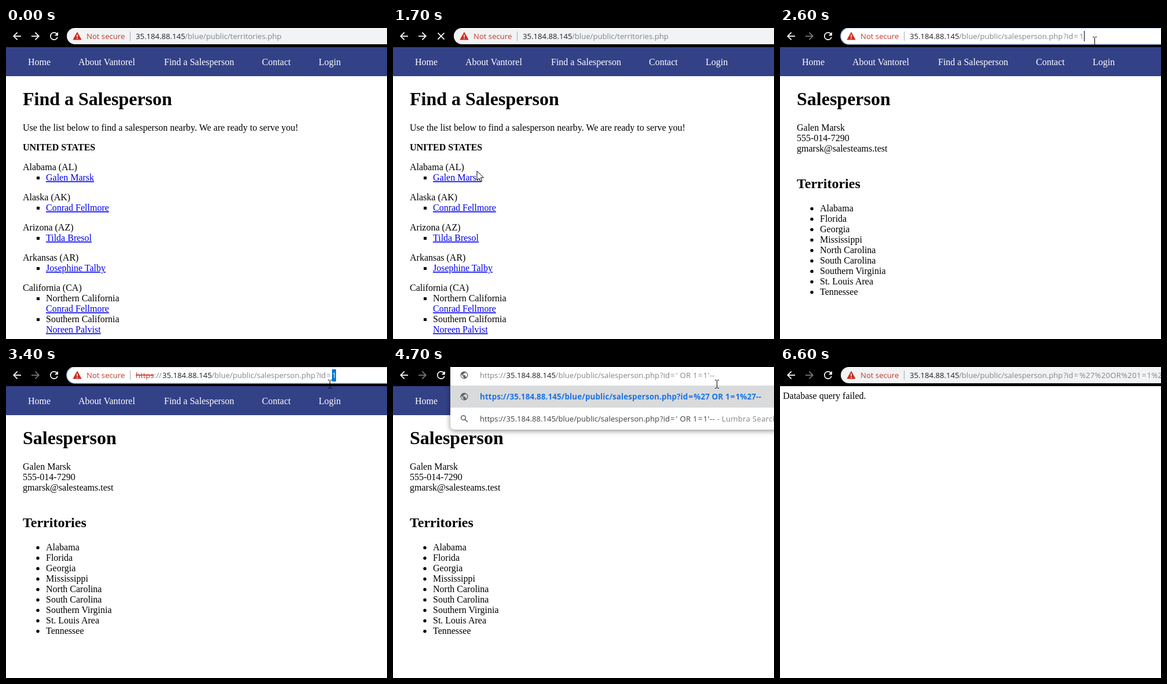
Recreate the animation shown at these times as an HTML page. Size 658 by 536 pixels, loop 6.8 s.

```html
<!DOCTYPE html>
<html lang="en">
<head>
<meta charset="utf-8">
<title>Salesperson lookup</title>
<style>
  html, body { margin: 0; width: 100%; height: 100%; overflow: hidden; background: #fff; }
  svg { display: block; }
  text { white-space: pre; }
  .page { font: 16px "Liberation Serif", "Times New Roman", serif; }
  .bar { font: 13.14px "Open Sans", "Noto Sans", sans-serif; }
  .popup { filter: drop-shadow(0 2px 5px rgba(0, 0, 0, .45)); }
</style>
</head>
<body>
<svg id="stage" width="658" height="536" viewBox="0 0 658 536"></svg>
<script>
const LOOP = 6800, STEP = 100;
const stage = document.getElementById('stage');
const DARK = '#202124', GREY = '#80868b', RED = '#c5392b', ICON = '#5f6368';
const HOST = '35.184.88.145', DIR = '/blue/public/', INJECTION = "' OR 1=1'--";

const ICONS = {
  back: 'M20 11H7.83l5.59-5.59L12 4l-8 8 8 8 1.41-1.41L7.83 13H20v-2z',
  forward: 'M4 11h12.17l-5.59-5.59L12 4l8 8-8 8-1.41-1.41L16.17 13H4v-2z',
  reload: 'M17.65 6.35A7.95 7.95 0 0 0 12 4a8 8 0 1 0 7.73 10h-2.08A6 6 0 1 1 12 6c1.66 0 3.14.69 4.22 1.78L13 11h7V4l-2.35 2.35z',
  stop: 'M19 6.41L17.59 5 12 10.59 6.41 5 5 6.41 10.59 12 5 17.59 6.41 19 12 13.41 17.59 19 19 17.59 13.41 12z',
  globe: 'M12 2a10 10 0 1 0 0 20 10 10 0 0 0 0-20zm-1 17.93A8 8 0 0 1 4 12c0-.62.08-1.21.21-1.79L9 15v1c0 1.1.9 2 2 2v1.93zm6.9-2.54A2 2 0 0 0 16 16h-1v-3c0-.55-.45-1-1-1H8v-2h2c.55 0 1-.45 1-1V7h2c1.1 0 2-.9 2-2v-.41A8 8 0 0 1 17.9 17.39z'
};

const rect = (x, y, w, h, fill, more = '') =>
  `<rect x="${x}" y="${y}" width="${w}" height="${h}" fill="${fill}" ${more}/>`;
const text = (x, y, s, fill = '#000', more = '') =>
  `<text x="${x}" y="${y}" fill="${fill}" ${more}>${s}</text>`;
const icon = (name, cx, cy, k, fill) =>
  `<path d="${ICONS[name]}" fill="${fill}" transform="translate(${cx} ${cy}) scale(${k}) translate(-12 -12)"/>`;
const bold = size => `font-weight="700" font-size="${size}"`;
// a little air on both sides of "="
const air = s => s.replace(/=(.?)/g, '<tspan dx="1.1">=</tspan><tspan dx="1">$1</tspan>');

// --- pages ---
function nav() {
  const links = [[38, 'Home'], [125, 'About Vantorel'], [273, 'Find a Salesperson'], [442, 'Contact'], [540, 'Login']];
  return rect(0, 33, 658, 50, '#334187') + links.map(([x, s]) => text(x, 64, s, '#fff')).join('');
}

function territories() {
  const link = (y, s) => text(69, y, s, '#0000ee', 'text-decoration="underline"');
  const square = y => rect(53, y - 7, 5, 5, '#000');
  const states = [['Alabama (AL)', 'Galen Marsk'], ['Alaska (AK)', 'Conrad Fellmore'],
    ['Arizona (AZ)', 'Tilda Bresol'], ['Arkansas (AR)', 'Josephine Talby']];
  const regions = [['Northern California', 'Conrad Fellmore'], ['Southern California', 'Noreen Palvist']];
  return nav() + text(29, 133, 'Find a Salesperson', '#000', bold(32))
    + text(29, 177, 'Use the list below to find a salesperson nearby. We are ready to serve you!')
    + text(29, 211, 'UNITED STATES', '#000', bold(16))
    + states.map(([s, who], i) => {
      const y = 245 + 52 * i;
      return text(29, y, s) + square(y + 18) + link(y + 18, who);
    }).join('')
    + text(29, 453, 'California (CA)')
    + regions.map(([s, who], i) => {
      const y = 471 + 36 * i;
      return square(y) + text(69, y, s) + link(y + 18, who);
    }).join('');
}

function salesperson() {
  const areas = ['Alabama', 'Florida', 'Georgia', 'Mississippi', 'North Carolina',
    'South Carolina', 'Southern Virginia', 'St. Louis Area', 'Tennessee'];
  return nav() + text(29, 133, 'Salesperson', '#000', bold(32))
    + ['Galen Marsk', '555-014-7290', 'gmarsk@salesteams.test'].map((s, i) => text(29, 177 + 18 * i, s)).join('')
    + text(29, 276, 'Territories', '#000', bold(24))
    + areas.map((s, i) => {
      const y = 316 + 18 * i;
      return `<circle cx="55" cy="${y - 4.5}" r="2.7"/>` + text(69, y, s);
    }).join('');
}

const failed = () => text(5, 55, 'Database query failed.');

// --- address bar ---
function address(x, y, tail, host = DARK, rest = GREY, after = '') {
  return text(x, y, HOST, host) + text(x + 85, y, DIR + 'salesperson.php', rest)
    + text(x + 265.4, y, air('?id='), rest)
    + text(x + 292.9, y, air(tail) + after, rest, 'letter-spacing=".3"');
}

function buttons(loading, canForward) {
  return rect(0, 0, 658, 33, '#000') + icon('back', 19, 14, .875, '#fff')
    + icon('forward', 51, 14, .875, canForward ? '#fff' : '#74777a')
    + icon(loading ? 'stop' : 'reload', 83, 14, .875, '#fff');
}

function field(focused) {
  const look = focused ? 'rx="14" stroke="#a9c4f1" stroke-width="1.6"' : 'rx="14"';
  return rect(105, 0, 620, 28, focused ? '#fff' : '#f1f3f4', look)
    + '<path d="M123 7.5L130 20H116Z" fill="#d02b20" stroke="#d02b20" stroke-linejoin="round"/>'
    + rect(122.2, 11.5, 1.6, 4.2, '#fff') + rect(122.2, 17, 1.6, 1.6, '#fff')
    + text(139, 19, 'Not secure', RED) + rect(214, 6, 1, 16, '#a3a7ab');
}

const caret = x => rect(x, 5, 1, 18, '#000');

function editing(selected) {
  return text(224, 19, `<tspan fill="${RED}" text-decoration="line-through">https</tspan>://`, GREY)
    + (selected ? rect(563, 4, 7, 21, '#0078d7') : '')
    + address(270, 19, selected ? '' : '1')
    + (selected ? text(562.9, 19, '1', '#fff') : caret(571));
}

function popup(typed) {
  const full = 'https://' + HOST + DIR + 'salesperson.php?id=' + typed.replace(/'/g, '%27');
  const hint = `<tspan fill="${GREY}"> - Lumbra Search</tspan>`;
  return '<g class="popup"><path d="M105 -6H680V108H107Q99 108 99 100V0Q99 -6 105 -6Z" fill="#fff"/></g>'
    + rect(99, 32, 559, 38, '#d9dadb')
    + icon('globe', 123, 14, .65, ICON) + icon('globe', 123, 51, .65, ICON)
    + `<g fill="none" stroke="${ICON}" stroke-width="1.6"><circle cx="121.5" cy="87.5" r="3.8"/><path d="M124.4 90.4L129 95"/></g>`
    + text(150, 19, 'https://', GREY) + address(150.6 + 45, 19, typed)
    + text(150, 56, air(full), '#1a73e8', bold(13.4) + ' letter-spacing=".12"')
    + text(150, 94, 'https://', '#3c4043') + address(150.6 + 45, 94, typed, '#3c4043', '#3c4043', hint);
}

function toolbar(t) {
  if (t < 1900) {
    return buttons(t >= 1600, true) + field(false) + text(224, 19, HOST, DARK)
      + text(309, 19, DIR + 'territories.php', GREY);
  }
  if (t < 2500) return buttons(false, false) + field(false) + address(224, 19, '1');
  if (t < 2800) return buttons(false, false) + field(true) + address(224, 19, '1') + caret(525);
  if (t < 4000) return buttons(false, false) + field(true) + editing(t >= 3300);
  if (t < 4800) {
    const count = Math.min(INJECTION.length, 1 + 2 * Math.min(4, (t - 4000) / 100) + (t >= 4600 ? 2 : 0));
    return buttons(false, false) + popup(INJECTION.slice(0, count));
  }
  return buttons(t < 4900, false) + field(false) + address(224, 19, '%27%20OR%201=1%27--');
}

// --- pointer: time, x, y ---
const PATH = [[400, 652, 500], [1000, 450, 394], [1500, 147, 248], [1600, 145, 246], [1900, 145, 246],
  [2500, 543, 22], [2700, 543, 22], [3100, 578, 29], [3200, 578, 29], [3400, 559, 29],
  [5500, 559, 29], [6000, 447, 410], [6100, 428, 466]];

function pointer(t) {
  const i = PATH.findIndex(p => p[0] > t);
  if (i === 0 || t > 6100) return '';
  const [t0, x0, y0] = PATH[i < 0 ? PATH.length - 1 : i - 1];
  const [t1, x1, y1] = PATH[i < 0 ? PATH.length - 1 : i];
  const k = t1 > t0 ? (t - t0) / (t1 - t0) : 0;
  const x = Math.round(x0 + (x1 - x0) * k), y = Math.round(y0 + (y1 - y0) * k);
  const shape = y < 30
    ? '<path d="M-3 -6.5H-.5M1.5 -6.5H4M-3 7.5H-.5M1.5 7.5H4M.5 -6V7" fill="none" stroke="#000"/>'
    : '<path d="M0 .5V16.5L3.8 13L6.4 19L8.9 18L6.4 12H11.5Z" fill="#fff" stroke="#000"/>';
  return `<g transform="translate(${x} ${y})">${shape}</g>`;
}

function draw(t) {
  const page = t < 1900 ? territories() : t < 4900 ? salesperson() : failed();
  stage.innerHTML = rect(0, 0, 658, 536, '#fff') + `<g class="page">${page}</g>`
    + `<g class="bar">${toolbar(t)}</g>` + pointer(t);
}

let shown = -1;
function tick() {
  const t = Math.floor(performance.now() % LOOP / STEP) * STEP;
  if (t !== shown) draw(shown = t);
  requestAnimationFrame(tick);
}
tick();
</script>
</body>
</html>
```
